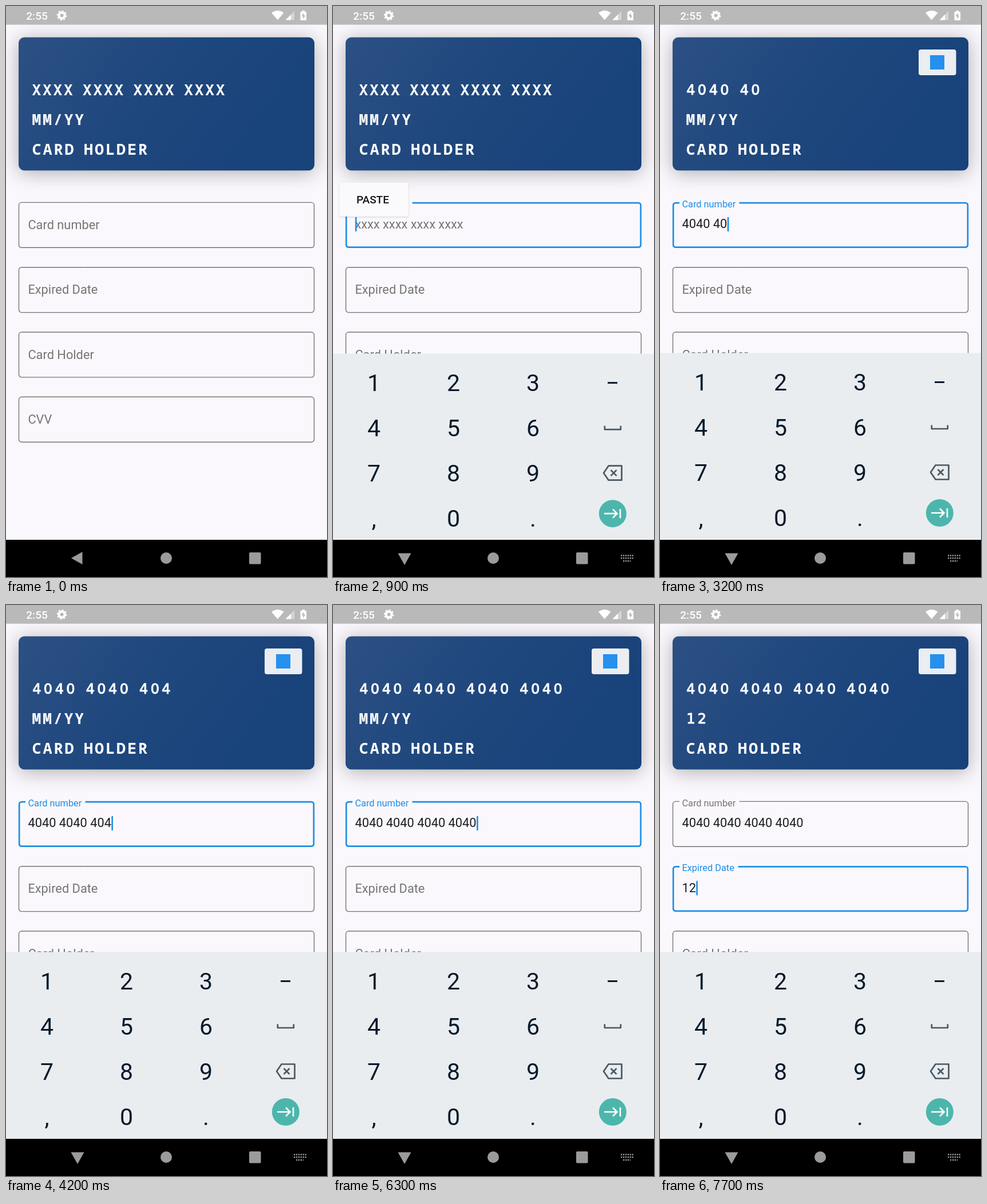
Recreate the animation shown at these times as an HTML page. Size 561 by 998 pixels, loop 8 s.

```html
<!DOCTYPE html>
<html lang="en">
<head>
<meta charset="utf-8">
<title>Card form</title>
<style>
html, body { margin: 0; width: 100%; height: 100%; overflow: hidden; background: #faf8fc; }
svg { display: block; width: 561px; height: 998px; font-family: Roboto, sans-serif; }

.card text { fill: #fff; text-anchor: middle; font: 600 27px "Noto Sans Mono", monospace; }
.card text.num { font: 400 24px "DejaVu Sans", sans-serif; stroke: #fff; stroke-width: 1px; }
.face { filter: drop-shadow(0 4px 17px rgba(0, 0, 0, .3)); }

.field { color: #757575; stroke-width: 2.8px; font-size: 21.8px; }
.box { fill: none; stroke: currentColor; }
.gap { stroke-dasharray: 1 2; }
.label { fill: currentColor; transform: translate(38.4px, 47.3px); }
.hint { fill: #757575; opacity: 0; }
.value { fill: #1d1d1f; }

.field, .label, .gap, .hint, #keys, #paste, .closed, .open {
  animation-duration: 8s; animation-iteration-count: infinite;
  animation-timing-function: cubic-bezier(.4, 0, .2, 1);
}
#f0 { animation-name: focus0; }
#f1 { animation-name: focus1; }
#f0 .label { animation-name: float0; }
#f1 .label { animation-name: float1; }
#f0 .gap { animation-name: part0; }
#f1 .gap { animation-name: part1; }
#f0 .hint { animation-name: hint0; }
#f1 .hint { animation-name: hint1; }
@keyframes focus0 {
  0%, 1% { color: #757575; stroke-width: 2.8px; }
  3.5%, 84.2% { color: #1e8ee6; stroke-width: 5.4px; }
  87%, 100% { color: #757575; stroke-width: 2.8px; }
}
@keyframes focus1 {
  0%, 84.2% { color: #757575; stroke-width: 2.8px; }
  87%, 100% { color: #1e8ee6; stroke-width: 5.4px; }
}
@keyframes float0 {
  0%, 1% { transform: translate(38.4px, 47.3px) scale(1); }
  3.5%, 100% { transform: translate(38.4px, 8.8px) scale(.75); }
}
@keyframes float1 {
  0%, 84.2% { transform: translate(38.4px, 47.3px) scale(1); }
  87%, 100% { transform: translate(38.4px, 8.8px) scale(.75); }
}
@keyframes part0 { 0%, 1% { stroke-dashoffset: 0; } 3.5%, 100% { stroke-dashoffset: -1.1; } }
@keyframes part1 { 0%, 84.2% { stroke-dashoffset: 0; } 87%, 100% { stroke-dashoffset: -1.1; } }
@keyframes hint0 { 0%, 1% { opacity: 0; } 3.5%, 100% { opacity: 1; } }
@keyframes hint1 { 0%, 84.2% { opacity: 0; } 87%, 100% { opacity: 1; } }

#paste { animation-name: paste; filter: drop-shadow(0 1px 1.5px rgba(0, 0, 0, .16)); }
@keyframes paste {
  0%, 8.75% { opacity: 0; }
  10.6%, 24.9% { opacity: 1; }
  26.2%, 100% { opacity: 0; }
}

#keys { animation-name: rise; font-size: 41px; text-anchor: middle; fill: #06192a; }
@keyframes rise {
  0%, 3.75% { transform: translateY(326px); animation-timing-function: cubic-bezier(.1, .7, .2, 1); }
  12.5%, 100% { transform: none; }
}
.closed { animation-name: closed; }
.open { animation-name: open; }
@keyframes closed { 0%, 3.74% { visibility: visible; } 3.75%, 100% { visibility: hidden; } }
@keyframes open { 0%, 3.74% { visibility: hidden; } 3.75%, 100% { visibility: visible; } }
</style>
</head>
<body>
<svg viewBox="0 0 561 998">
  <defs>
    <linearGradient id="blue" x1="0" y1="0" x2="1" y2=".35">
      <stop offset="0" stop-color="#2c5084"/>
      <stop offset=".55" stop-color="#1e477d"/>
      <stop offset="1" stop-color="#18427a"/>
    </linearGradient>
    <clipPath id="inside"><rect x="21.8" width="517.4" height="80.3" rx="5.5"/></clipPath>
  </defs>
  <rect width="561" height="998" fill="#faf8fc"/>

  <g class="card">
    <rect class="face" x="22" y="54.7" width="517" height="232.8" rx="10" fill="url(#blue)"/>
    <g id="badge">
      <rect x="452" y="76" width="65.5" height="45" rx="4" fill="#ebedf1"/>
      <rect x="472" y="86" width="25" height="25" fill="#2590ee"/>
    </g>
    <text id="number"></text>
    <text id="date"></text>
    <text id="holder"></text>
  </g>

  <g id="form"></g>
  <rect id="caret" width="2.6" height="25" fill="#1e8ee6"/>

  <g id="paste">
    <rect x="11" y="308.5" width="121" height="59.5" rx="2" fill="#faf9fb"/>
    <text x="41" y="345" font-size="19" font-weight="500" fill="#151515">PASTE</text>
  </g>

  <g id="keys">
    <rect y="606.5" width="561" height="327" fill="#e9edf0"/>
    <path d="M480 657.5h17" stroke="#06192a" stroke-width="3"/>
    <g fill="none" stroke="#4b5862" stroke-width="2.7" stroke-linejoin="round">
      <path d="M474.8 732.5v6.5h28v-6.5"/>
      <path d="M481.5 802.5h23v25h-23l-8.5-12.5zM485.5 810l10 10m0-10l-10 10"/>
    </g>
    <circle cx="488.8" cy="886" r="24" fill="#4db6ac"/>
    <path d="M474 886h22M489 878.5l7.5 7.5-7.5 7.5M502 878v16" fill="none" stroke="#fff" stroke-width="2.6"/>
  </g>

  <rect width="561" height="32.7" fill="#bab9ba"/>
  <g fill="#fff">
    <text x="35.3" y="23.5" font-size="19" font-weight="500">2:55</text>
    <g fill="none" stroke="#fff" transform="translate(97.6 16.5)">
      <circle r="5" stroke-width="4"/>
      <circle r="7.2" stroke-width="3.2" pathLength="16" stroke-dasharray="1"/>
    </g>
    <path d="M464 12Q474.7 4 485.5 12L474.7 24.5z"/>
    <path d="M504 9V24.5H488.5z" opacity=".4"/>
    <path d="M498 15V24.5H488.5z"/>
    <path d="M517.5 8h4.5v2h3v15h-10.5v-15h3z"/>
    <path d="M520.5 11.5l-4 6.5h2.7v5l4-6.5h-2.7z" fill="#bab9ba"/>
  </g>

  <rect y="933" width="561" height="65" fill="#000"/>
  <g fill="#9b9b9b">
    <path class="closed" d="M114 965L133.5 954V976z"/>
    <path class="open" d="M113.5 956.5H136.5L125 977z"/>
    <circle cx="280" cy="965" r="10"/>
    <rect x="425" y="955" width="20.5" height="20.5" rx="2"/>
    <path class="open" d="M503 960.5h22M503 965h22M507 970h13" fill="none" stroke="#9b9b9b" stroke-width="2.3" stroke-dasharray="2.3 1.6"/>
  </g>
</svg>

<script>
const LOOP = 8000;
const FOCUS_DATE = 6750;
const NUMBER_TIMES = [2000, 2300, 2500, 2800, 3000, 3200, 3400, 3600,
                      3800, 4000, 4200, 4600, 5100, 5500, 5900, 6300];
const DATE_TIMES = [7500, 7700];
const FIELD_TOP = 342.7, FIELD_STEP = 113.3;
const $ = id => document.getElementById(id);

function fieldMarkup(label, i, hint = '', gapEnd = 138) {
  const r = 'a5.5 5.5 0 0 1 ';
  return `<g transform="translate(0 ${FIELD_TOP + i * FIELD_STEP})"><g class="field" id="f${i}">
    <g class="box" clip-path="url(#inside)">
      <path d="M${gapEnd} 0H533.7${r}5.5 5.5V74.8${r}-5.5 5.5H27.3${r}-5.5 -5.5V5.5${r}5.5 -5.5H34"/>
      <path class="gap" pathLength="1" d="M34 0H${gapEnd}"/>
    </g>
    <text class="label">${label}</text>
    <text class="hint" x="38.4" y="46">${hint}</text>
    <text class="value" x="38.4" y="45.8"></text>
  </g></g>`;
}

$('form').innerHTML =
  fieldMarkup('Card number', 0, 'xxxx xxxx xxxx xxxx', 138.5) +
  fieldMarkup('Expired Date', 1, 'MM/YY', 136.5) +
  fieldMarkup('Card Holder', 2) +
  fieldMarkup('CVV', 3);

['123', '456', '789', ',0.'].forEach((row, r) => [...row].forEach((key, c) =>
  $('keys').insertAdjacentHTML('beforeend',
    `<text x="${71.5 + c * 139}" y="${672 + r * 79}">${key}</text>`)));

// Sets a line of embossed text on a fixed pitch, each glyph centred in its cell.
function emboss(id, text, pitch, y) {
  const el = $(id);
  if (el.textContent === text) return;
  const digits = /\d/.test(text);
  const advance = digits ? 19.7 : pitch;
  let x = 45.3;
  const places = [...text].map(ch => {
    const w = ch === ' ' ? 14.6 : advance;
    const mid = x + (w - 2.6) / 2;
    x += w;
    return mid.toFixed(1);
  });
  el.setAttribute('class', digits ? 'num' : '');
  el.setAttribute('x', places.join(' '));
  el.setAttribute('y', digits ? y - 1 : y);
  el.textContent = text;
}

function fill(i, text) {
  const value = document.querySelector(`#f${i} .value`);
  if (value.textContent !== text) value.textContent = text;
  document.querySelector(`#f${i} .hint`).style.display = text ? 'none' : '';
  return value;
}

const typed = (text, times, t) => text.slice(0, times.filter(at => at <= t).length);

function draw(t) {
  const number = typed('40'.repeat(8), NUMBER_TIMES, t).replace(/(.{4})(?=.)/g, '$1 ');
  const date = typed('12', DATE_TIMES, t);
  emboss('number', number || 'XXXX XXXX XXXX XXXX', 18.5, 155.5);
  emboss('date', date || 'MM/YY', 18.7, 207.5);
  emboss('holder', 'CARD HOLDER', 19, 259.5);
  $('badge').style.display = number ? '' : 'none';

  const values = [fill(0, number), fill(1, date)];
  const active = t < FOCUS_DATE ? 0 : 1;
  const width = values[active].textContent ? values[active].getComputedTextLength() : 0;
  const caret = $('caret');
  caret.setAttribute('x', 38.8 + width);
  caret.setAttribute('y', FIELD_TOP + active * FIELD_STEP + 26.3);
  caret.style.display = (t >= 100 && t < 1400) || t >= NUMBER_TIMES[0] ? '' : 'none';
}

let start;
function tick(now) {
  start ??= now;
  draw((now - start) % LOOP);
  requestAnimationFrame(tick);
}
draw(0);
requestAnimationFrame(tick);
</script>
</body>
</html>
```
